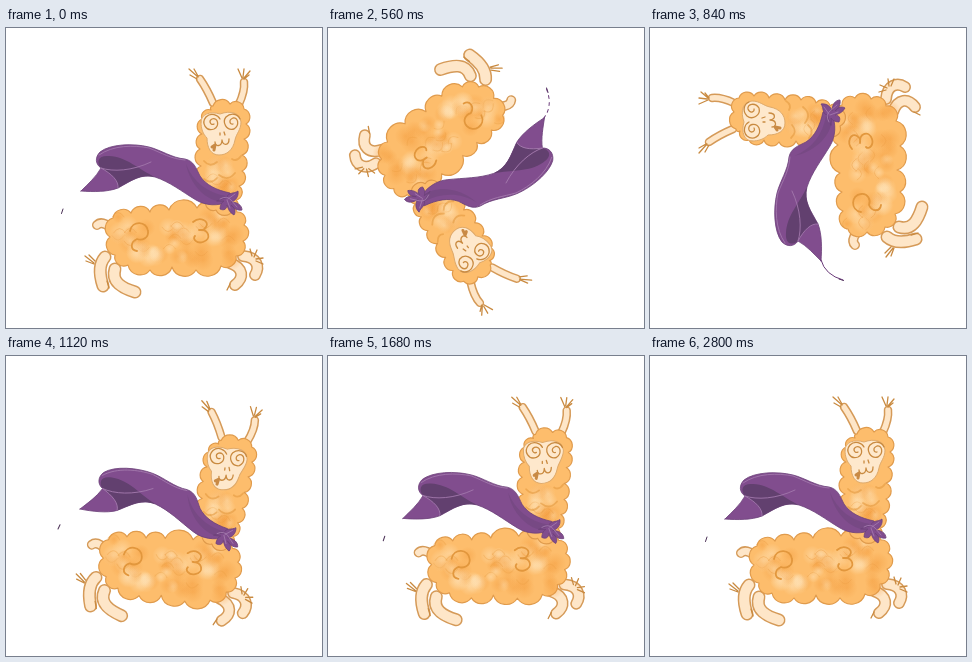
These frames come from a looping animation (316 px wide and 300 px high, 2870 ms). An HTML page:

```html
<!DOCTYPE html>
<html lang="en">
<head>
<meta charset="utf-8">
<title>Tumbling llama</title>
<style>
  html, body { margin: 0; height: 100%; overflow: hidden; background: #fff; }
  svg { display: block; width: 100%; height: 100%; }
  path { stroke-linecap: round; stroke-linejoin: round; }
  .line { fill: none; stroke: #c98a40; stroke-width: 1.3; }
  .curl { fill: none; stroke: #e2973d; stroke-width: 1.8; }
  .wool { fill: #fdbd6c; stroke: #e09b4c; stroke-width: 1.2; }
  .scallop { fill: none; stroke: #ec9f47; stroke-opacity: .4; }
  .rim { fill: none; stroke: #d59a58; }
  .skin { fill: none; stroke: #fee6c8; }
  .cape { fill: #814d8e; stroke: #6d427a; stroke-width: .8; }
  .fold { fill: #62406f; }
  .sheen { fill: none; stroke: #a278ac; stroke-width: .9; }
</style>
</head>
<body>
<svg viewBox="0 0 316 300">
  <defs>
    <radialGradient id="pale">
      <stop offset="0" stop-color="#ffe2b6" stop-opacity=".55"/>
      <stop offset="1" stop-color="#ffe2b6" stop-opacity="0"/>
    </radialGradient>
    <radialGradient id="warm">
      <stop offset="0" stop-color="#f39b3c" stop-opacity=".45"/>
      <stop offset="1" stop-color="#f39b3c" stop-opacity="0"/>
    </radialGradient>
  </defs>
  <g id="llama">
    <g id="limbs"></g>
    <!-- hoof and ear tufts -->
    <path class="line" d="M88 235L79 228M88 236L80 233M89 233L83 227M101 253L103 260
      M246 228L244 221M248 229L251 222M250 231L257 230M250 233L257 236M224 256L221 262
      M192 49L183 41M192 48L188 41M191 51L184 47M236 50L232 41M237 49L238 41M238 50L244 43M238 51L243 47"/>
    <path id="body" class="wool"/>
    <g id="bodyTint"></g>
    <path class="curl" d="M124 203C126 192 141 193 142 203C143 210 136 213 131 211C124 214 124 222 131 223
      M187 194C194 188 204 193 200 199C198 203 193 202 193 202C203 201 206 211 197 214C191 216 186 211 189 208"/>
    <path id="neck" class="wool"/>
    <g id="neckTint"></g>
    <path class="curl" stroke-opacity=".55" d="M198 133Q204 140 211 134M213 147Q222 154 229 145M198 151Q205 157 211 150M226 131Q231 134 235 128"/>
    <path fill="#fee8cc" stroke="#dfaa6b" d="M195 94C195 86 204 83 214 86C225 82 234 85 235 94C235 102 230 106 229 112C227 122 221 127 213 127C205 127 201 120 201 110C197 106 195 101 195 94Z"/>
    <path class="line" stroke-width="1.8" d="M208 96C205 98 202 93 206 91C212 89 214 98 208 101C200 104 195 95 200 89C205 84 212 87 214 91
      M227 96C224 97 222 92 227 90C232 89 234 97 228 101C220 103 216 94 220 89C225 84 232 86 234 91"/>
    <path class="line" d="M214 105L214 107M218 104L219 107M209 114C209 119 216 119 216 112C217 118 223 118 223 111"/>
    <path fill="none" stroke="#c98a45" stroke-width="3" d="M206 119L209 117L208 122"/>
    <path class="cape" d="M75 163C82 156 90 149 95 140C89 136 89 129 94 124C104 116 127 115 143 119C155 122 166 130 179 131C188 133 190 140 194 148C200 157 210 162 224 165L222 174C212 178 200 178 190 172C175 163 164 154 149 149C135 145 125 153 112 160C102 164 87 164 75 163Z"/>
    <path class="fold" d="M95 140C90 134 92 127 103 128C121 129 132 141 149 149C134 146 125 153 112 160C113 153 106 146 95 140Z"/>
    <path class="sheen" d="M95 140C107 144 126 143 145 134M95 140C106 146 113 153 112 160M93 127C107 117 128 117 143 120C156 125 165 131 179 132"/>
    <path class="fold" opacity=".3" d="M180 136C187 154 202 165 220 168L220 174C201 175 184 157 180 136Z"/>
    <!-- knot: three leaves and the tie -->
    <path class="cape" d="M221 169C222 164 228 166 232 163C233 169 229 173 225 174C231 174 236 177 236 182C231 183 227 180 225 177
      C229 180 230 184 228 187C224 185 222 181 221 177C221 181 218 183 214 181C214 177 216 174 218 173L211 173Z"/>
    <path class="sheen" d="M214 171Q221 167 225 172L231 179M221 172L224 180M222 171L229 166"/>
    <path d="M57 181L55.5 185.5" stroke="#4b3156"/>
    <path id="thread" fill="none" stroke="#6a3b79" d="M76 163Q61 167 56 185"/>
  </g>
</svg>
<script>
const FRAME = 70, LOOP = 2870;
const el = id => document.getElementById(id);
const add = (id, markup) => el(id).insertAdjacentHTML('beforeend', markup);

let seed = 11;
const random = () => (seed = seed * 16807 % 2147483647) / 2147483647;

// Closed outline of outward arcs between the given x,y pairs
function cloud(id, text) {
  const points = text.split(' ').map(p => p.split(',').map(Number));
  let [px, py] = points[points.length - 1], d = `M${px} ${py}`;
  for (const [x, y] of points) {
    const r = Math.hypot(x - px, y - py) * 0.55;
    d += `A${r} ${r} 0 0 1 ${x} ${y}`;
    [px, py] = [x, y];
  }
  el(id).setAttribute('d', d + 'Z');
}

// Soft watercolour patches and faint scallops inside a box
function tint(id, left, top, width, height, count) {
  for (let i = 0; i < count; i++) {
    const x = left + random() * width, y = top + random() * height, r = 6 + random() * 6;
    add(id, `<circle cx="${x}" cy="${y}" r="${r}" fill="url(#${i % 2 ? 'pale' : 'warm'})"/>`);
    if (i % 3 === 0) add(id, `<path class="scallop" d="M${x - 6} ${y}q6 ${random() < 0.5 ? 9 : -9} 12 0"/>`);
  }
}

function limb(d, width) {
  add('limbs', `<path class="rim" d="${d}" stroke-width="${width}"/><path class="skin" d="${d}" stroke-width="${width - 3}"/>`);
}

limb('M108 206C104 196 95 193 91 197', 10);
limb('M99 229C92 237 94 249 97 258', 13);
limb('M109 241C105 254 116 260 129 264', 13);
limb('M224 235C238 240 238 250 229 257', 12);
limb('M237 228C251 229 254 239 249 247', 12);
limb('M194 51Q201 61 207 75', 8.5);
limb('M238 54Q239 63 233 76', 8.5);
cloud('body', '107,190 125,185 144,184 163,182 191,180 213,182 231,184 238,197 237,213 230,228 215,238 ' +
  '190,242 166,239 144,242 122,237 109,227 104,209');
cloud('neck', '200,172 195,155 195,138 194,121 196,106 196,91 205,82 207,78 224,76 238,81 ' +
  '240,96 238,111 236,127 236,143 233,158 230,172 227,182 210,182');
tint('bodyTint', 112, 188, 116, 44, 54);
tint('neckTint', 203, 132, 22, 32, 14);

// Degrees and degrees per step at every fourth step of the tumble
const turn = [0, 29, 143, 270, 366.9], speed = [0, 17.9, 30, 28, 4.6];

function angleAt(step) {
  if (step >= 32) return 0;
  if (step >= 16) {
    const u = step - 15.1;
    return 360 + 14 * Math.exp(-0.26 * u) * Math.sin(0.74 * u);
  }
  const i = Math.floor(step / 4), s = step / 4 - i, q = 1 - s;
  return turn[i] * (1 + 2 * s) * q * q + turn[i + 1] * (3 - 2 * s) * s * s
    + 4 * s * q * (speed[i] * q - speed[i + 1] * s);
}

function draw() {
  const angle = angleAt(Math.floor(performance.now() % LOOP / FRAME));
  el('llama').setAttribute('transform', `rotate(${angle} 158 150)`);
  el('thread').setAttribute('opacity', angle > 90 && angle < 340 ? 1 : 0);
  el('thread').setAttribute('stroke-dasharray', angle < 200 ? '3 4' : 'none');
  requestAnimationFrame(draw);
}
draw();
</script>
</body>
</html>
```
